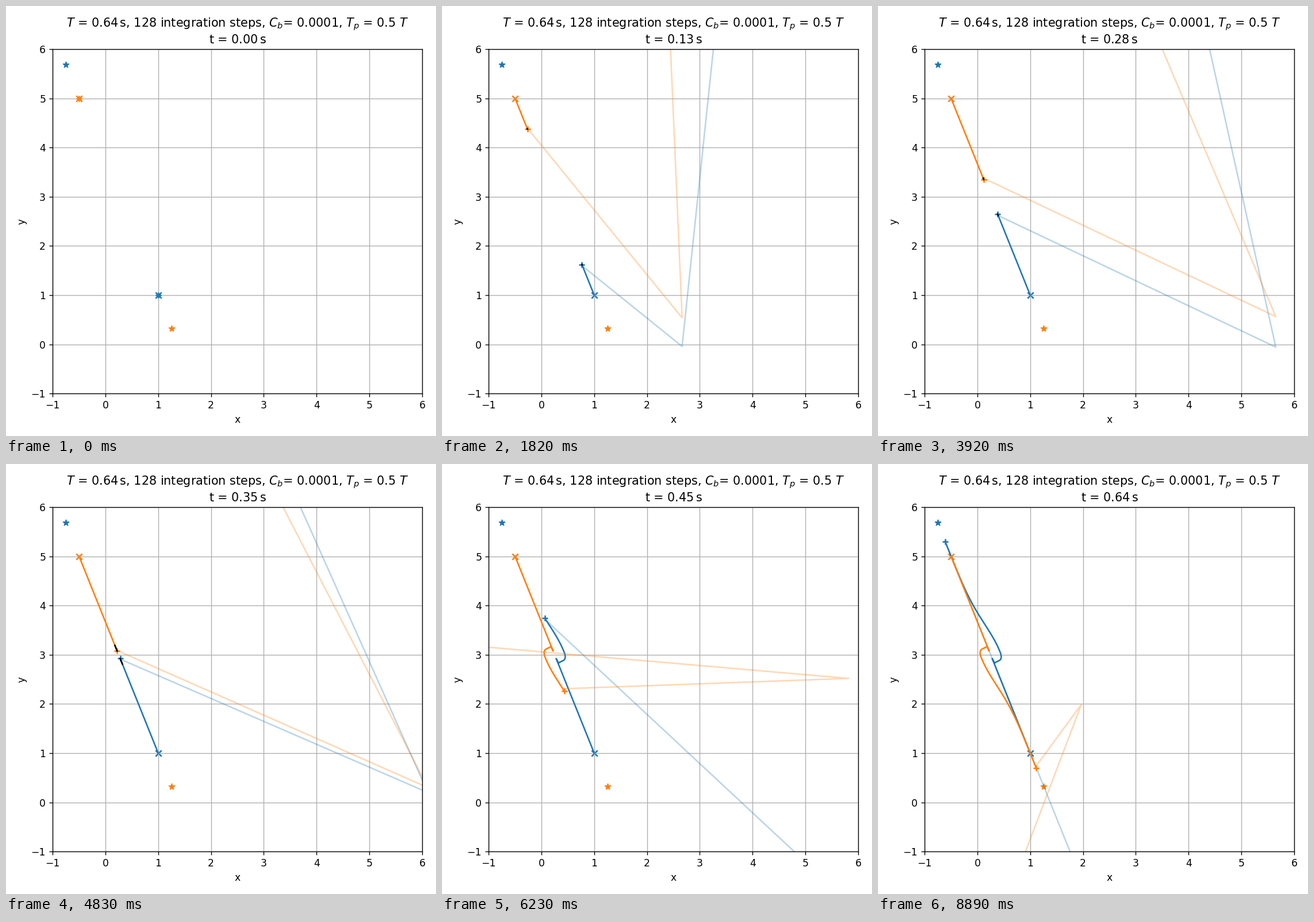
A matplotlib script that plays this animation: 748x748 px, repeating every 8.96 s.

```python
import numpy as np
import matplotlib.pyplot as plt
from matplotlib.animation import FuncAnimation

SIZE, N, DT, MEET = 748, 128, 0.005, 69
COLORS = ("C0", "C1")
START = np.array([[1.0, 1.0], [-0.5, 5.0]])
CENTER = START.mean(axis=0)
REACH = np.linalg.norm(START[0] - CENTER)
AHEAD = (CENTER - START[0]) / REACH
SIDE = np.array([AHEAD[1], -AHEAD[0]])
GOAL = START + 5 * np.array([AHEAD, -AHEAD])

# height of the plan's corner and direction of its last leg at a few times
KEYS = (26, 43, 69, 89, 104, 127)
HEIGHT = ((-0.04, -0.31, 0.20, -2.03, -1.37, -1.57),
          (0.54, 0.83, 0.30, 2.52, 1.87, 1.99))
ANGLE = ((84.4, 90.8, 112.6, 180, 225, 250),
         (92.3, 107.5, 115.7, 174.7, 205.6, 250.5))


def travel():
    """Path of the first agent: approach, short recoil, swerve, cruise."""
    i = np.arange(N)
    x = i / MEET
    approach = 2.055 * x * (0.33 + 1.85 * x - 1.18 * x ** 2) - REACH

    t = np.maximum(i - MEET, 0)
    tau = t - 8.5
    cruise = 0.051 + 0.0655 * tau - 0.00034 * tau ** 2
    recoil = -0.165 - 0.03 * np.exp(-t / 2)
    after = recoil + 0.03 * np.logaddexp(0, (cruise + 0.165) / 0.03)

    along = np.where(i <= MEET, approach, after)
    ramp = np.clip(t / 7, 0, 1)
    across = 0.187 * np.exp(-(along / 0.87) ** 2) * ramp ** 2 * (3 - 2 * ramp)
    return CENTER + along[:, None] * AHEAD + across[:, None] * SIDE


first = travel()
PATHS = [first, 2 * CENTER - first]


def plan(k, i):
    x = max(6.15 - 0.0015 * (i - 74.2) ** 2, 1)
    y = np.interp(i, KEYS, HEIGHT[k])
    a = np.radians(np.interp(i, KEYS, ANGLE[k]))
    px, py = PATHS[k][i - 1]
    return [px, x, x + 14 * np.cos(a)], [py, y, y + 14 * np.sin(a)]


def title(i):
    return ("$T$ = 0.64$\\,$s, 128 integration steps, $C_b$= 0.0001, "
            "$T_p$ = 0.5 $T$\n" + f"t = {i * DT:.2f}$\\,$s")


fig, ax = plt.subplots(figsize=(6, 6), dpi=SIZE / 6)
ax.set(xlim=(-1, 6), ylim=(-1, 6), xlabel="x", ylabel="y")
ax.grid(True)
heading = ax.set_title(title(0))
fig.tight_layout()

plans, trails, heads, pushes = [], [], [], []
for k, c in enumerate(COLORS):
    ax.scatter(*START[k], marker="x", color=c)
    ax.scatter(*GOAL[k], marker="*", color=c)
    plans += ax.plot([], [], color=c, alpha=0.3)
    trails += ax.plot([], [], color=c)
for c in COLORS:
    heads += ax.plot([], [], "+", color=c, mew=1.5, zorder=3)
    pushes += ax.plot([], [], color="k", zorder=4)


def update(i):
    heading.set_text(title(i))
    for k in (0, 1):
        pos, other = PATHS[k][i], PATHS[1 - k][i]
        trails[k].set_data(PATHS[k][:i + 1].T)
        heads[k].set_data([pos[0]], [pos[1]])
        plans[k].set_data(*(plan(k, i) if i else ([], [])))
        # repulsion while closing in, inversely proportional to distance
        if 0 < i < MEET + 14:
            gap = pos - other
            tip = pos + 0.02 * gap / (gap @ gap)
            pushes[k].set_data([pos[0], tip[0]], [pos[1], tip[1]])
        else:
            pushes[k].set_data([], [])
    return plans + trails + heads + pushes + [heading]


anim = FuncAnimation(fig, update, frames=N, interval=70, repeat=True,
                     repeat_delay=0, blit=False)
plt.show()
```
